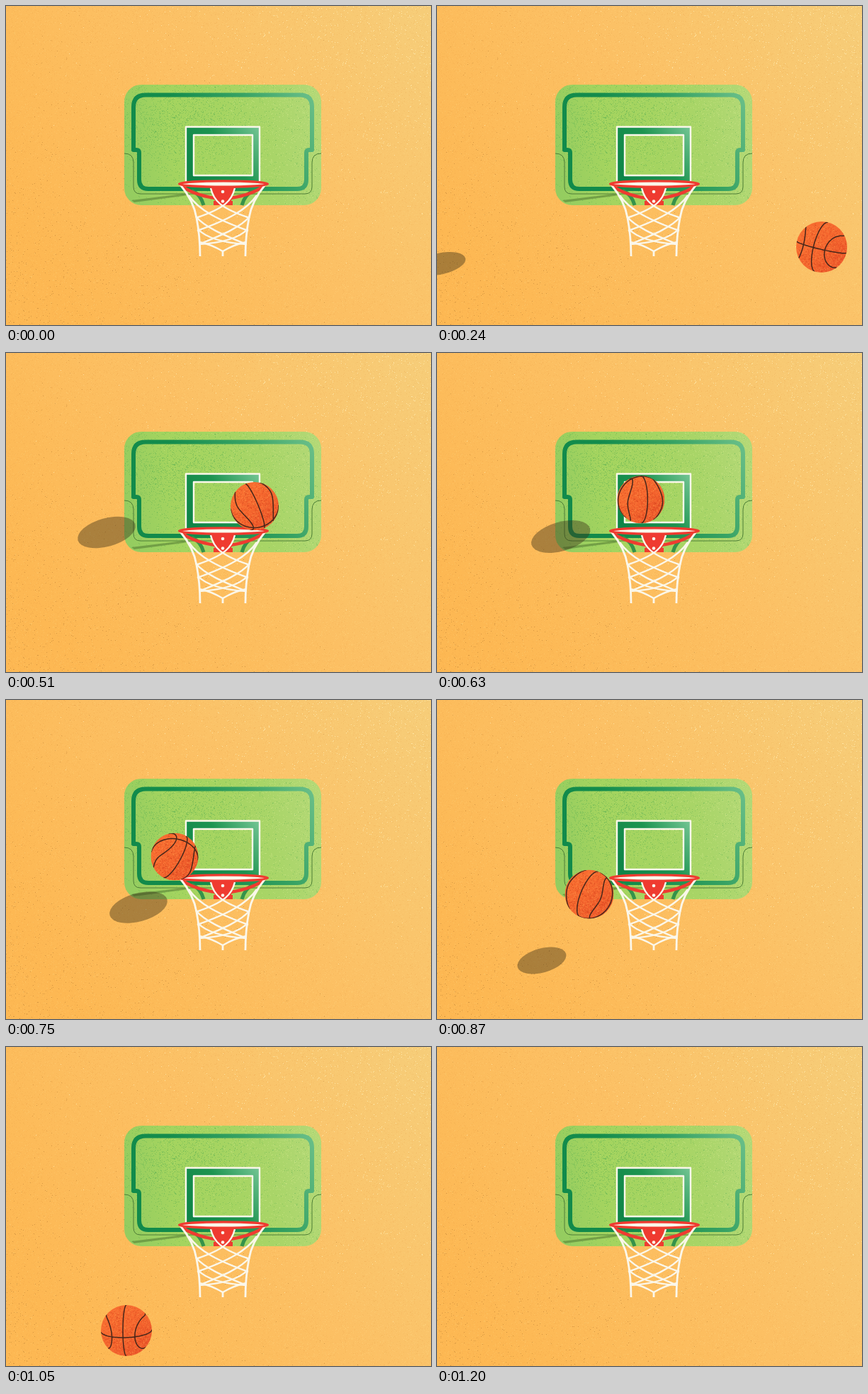
Animation of 600 by 450 pixels, one loop 2550 ms. Source, as an HTML page with a canvas:

```html
<!DOCTYPE html>
<html lang="en">
<head>
<meta charset="utf-8">
<title>Rim shot</title>
<style>
html, body { margin: 0; width: 100%; height: 100%; overflow: hidden; background: #fcbf62; }
canvas { display: block; width: 600px; height: 450px; }
</style>
</head>
<body>
<canvas id="stage" width="600" height="450"></canvas>
<script>
const W = 600, H = 450, LOOP = 2550, STEP = 30, START = 90, END = 1200;
const WHITE = '#fbf7ea', RED = '#ef3b30';
const ctx = document.getElementById('stage').getContext('2d');

function seeded(seed) {
  return () => {
    seed = (seed + 0x6D2B79F5) | 0;
    let t = Math.imul(seed ^ (seed >>> 15), 1 | seed);
    t = (t + Math.imul(t ^ (t >>> 7), 61 | t)) ^ t;
    return ((t ^ (t >>> 14)) >>> 0) / 4294967296;
  };
}

function layer(paint) {
  const c = document.createElement('canvas');
  c.width = W;
  c.height = H;
  paint(c.getContext('2d'));
  return c;
}

function ramp(g, x0, y0, x1, y1, ...colors) {
  const r = g.createLinearGradient(x0, y0, x1, y1);
  colors.forEach((c, i) => r.addColorStop(i / (colors.length - 1), c));
  return r;
}

function stroke(g, d, color, width) {
  g.strokeStyle = color;
  g.lineWidth = width;
  g.stroke(new Path2D(d));
}

// Scatter pixels in a box; weight(u, v) is the chance that a dot is kept.
function speckle(g, rnd, n, [x, y, w, h], color, weight) {
  g.fillStyle = color;
  for (let i = 0; i < n; i++) {
    const u = rnd(), v = rnd();
    if (rnd() < weight(u, v)) g.fillRect(Math.floor(x + u * w), Math.floor(y + v * h), 1, 1);
  }
}

function paintWall(g) {
  const rnd = seeded(7), all = [0, 0, W, H];
  g.fillStyle = ramp(g, 60, 380, 600, 0, '#fdb853', '#fcc064', '#f6cd79');
  g.fillRect(0, 0, W, H);
  speckle(g, rnd, 26000, all, 'rgba(255,222,140,.25)', u => .25 + .5 * u);
  speckle(g, rnd, 26000, all, 'rgba(226,150,60,.18)', u => .8 - .4 * u);
  speckle(g, rnd, 9000, all, 'rgba(255,236,175,.8)', (u, v) => Math.pow(u * (1 - v), 2));
  speckle(g, rnd, 7000, all, 'rgba(176,118,48,.5)', (u, v) => .7 * Math.pow((1 - u) * v, 2));
  speckle(g, rnd, 1500, all, 'rgba(176,118,48,.4)', u => .5 * Math.pow(1 - u, 5));
}

function paintBoard(g) {
  const rnd = seeded(21), box = [167, 111, 278, 170];
  g.save();
  g.beginPath();
  g.roundRect(...box, 24);
  g.clip();
  g.fillStyle = ramp(g, 167, 215, 445, 175, '#94cc60', '#a4d45f', '#a5d461', '#a9d568', '#b3d876');
  g.fillRect(...box);
  speckle(g, rnd, 10000, box, 'rgba(92,176,82,.45)',
    (u, v) => .08 + .8 * Math.exp(-12 * ((u - .28) ** 2 + (v - .35) ** 2)));
  speckle(g, rnd, 6000, box, 'rgba(205,230,135,.55)', (u, v) => u * u * (1 - .6 * v));
  g.restore();

  g.lineJoin = 'round';
  stroke(g, 'M167 208Q180 208 180 221V255Q180 265 190 265H422Q432 265 432 255V221Q432 208 445 208',
    '#4c7d36', 1);
  stroke(g, 'M197 125.500H415Q432 125.500 432 142.500V203H428Q424 203 424 207V245Q424 258 411 258' +
    'H201Q188 258 188 245V207Q188 203 184 203H180V142.500Q180 125.500 197 125.500Z',
    ramp(g, 190, 240, 425, 110, '#118a4b', '#138c4c', '#36a263', '#6abf89'), 6);

  g.fillStyle = ramp(g, 265, 240, 358, 172, '#0f8548', '#1c9450', '#74c594');
  g.beginPath();
  g.rect(254, 170, 104, 77);
  g.rect(265, 182, 83, 57);
  g.fill('evenodd');
  g.strokeStyle = WHITE;
  g.lineWidth = 2.4;
  g.strokeRect(254, 170.500, 104, 78);
  g.strokeRect(265, 182, 83, 57);

  g.fillStyle = 'rgba(80,120,50,.55)';
  g.fill(new Path2D('M177 274L250 265L260 266L250 268L181 277Z'));
}

function mirrored(g, draw) {
  draw();
  g.save();
  g.translate(612, 0);
  g.scale(-1, 1);
  draw();
  g.restore();
}

function paintHoop(g) {
  mirrored(g, () => {
    stroke(g, 'M262 260Q275 266 279 281', '#35924a', 5);
    stroke(g, 'M247 253Q263 266 295 271', RED, 4.500);
  });
  g.fillStyle = RED;
  g.fill(new Path2D('M289 255H323L318 275H320V281H293V275H295Z'));
  g.fillStyle = WHITE;
  for (const y of [262, 275.500]) {
    g.beginPath();
    g.arc(306, y, 2.300, 0, 7);
    g.fill();
  }

  mirrored(g, () => {
    stroke(g, 'M246 252Q265 275 269 299Q274 325 274 353', WHITE, 2.800);
    stroke(g, 'M289 257C293 274 302 285 344 299', WHITE, 2.400);
    stroke(g, 'M258 267C272 288 300 302 342 317', WHITE, 2.400);
    stroke(g, 'M268 297C280 311 302 321 339 336', WHITE, 2.400);
    stroke(g, 'M271 315C282 326 304 334 339 336', WHITE, 2.400);
    stroke(g, 'M273 333Q289 336 306 346', WHITE, 2.400);
  });
  stroke(g, 'M306 345V353', WHITE, 2.800);

  g.fillStyle = WHITE;
  g.strokeStyle = RED;
  g.lineWidth = 3.2;
  g.beginPath();
  g.ellipse(307, 251, 62.500, 4.2, 0, 0, 7);
  g.fill();
  g.stroke();
}

const wall = layer(g => { paintWall(g); paintBoard(g); });
const hoop = layer(paintHoop);

// time, x, y, radius, pitch, yaw, roll
const BALL = [
  [90, 642, 468, 37, -.65, -.5, .5],
  [240, 543, 340, 36, .1, -.32, .26],
  [510, 351, 216, 34, 1.13, .15, -.4],
  [750, 238, 221, 33.5, 2.25, .27, .5],
  [870, 215, 274, 34.5, 1.57, -.35, .4],
  [1050, 170, 400, 36, .28, -.14, 0],
  [1140, 148, 463, 36, -.3, -.2, -.15],
  [1200, 134, 505, 36, -.7, -.2, -.25]
];
// time, x, y, half length, half height, tilt
const SHADE = [
  [90, -85, 446, 34, 14, -.2],
  [240, 5, 363.5, 36, 15, -.21],
  [510, 142, 253, 42, 20, -.27],
  [750, 187, 292.5, 42, 20, -.27],
  [870, 148, 367.5, 35.5, 17, -.27],
  [1050, 92, 488, 34, 16, -.27],
  [1200, 45, 590, 34, 16, -.27]
];

// Smooth curve through the rows of a table.
function sample(rows, t) {
  let i = 0;
  while (i < rows.length - 2 && t >= rows[i + 1][0]) i++;
  const a = rows[i], b = rows[i + 1], p = rows[i - 1] || a, n = rows[i + 2] || b;
  const d = b[0] - a[0], s = (t - a[0]) / d, s2 = s * s, s3 = s2 * s;
  return a.slice(1).map((v, j) => {
    const k = j + 1;
    const ma = (b[k] - p[k]) / (b[0] - p[0]) * d, mb = (n[k] - a[k]) / (n[0] - a[0]) * d;
    return (2 * s3 - 3 * s2 + 1) * v + (s3 - 2 * s2 + s) * ma +
      (3 * s2 - 2 * s3) * b[k] + (s3 - s2) * mb;
  });
}

// Four closed seams on the unit sphere.
const sideSeam = sign => f => {
  const q = .9 + .2 * Math.cos(2 * f);
  return [sign * Math.cos(q), Math.sin(q) * Math.sin(f), Math.sin(q) * Math.cos(f)];
};
const SEAMS = [
  f => [0, Math.sin(f), Math.cos(f)],
  f => [Math.sin(f), 0, Math.cos(f)],
  sideSeam(1),
  sideSeam(-1)
];

const ballRnd = seeded(5);
const GRAIN = Array.from({ length: 1300 }, () => {
  const a = ballRnd() * 2 * Math.PI, q = Math.sqrt(ballRnd()) * .97;
  return [q * Math.cos(a), q * Math.sin(a), ballRnd()];
});

function turn([x, y, z], pitch, yaw) {
  const cp = Math.cos(pitch), sp = Math.sin(pitch), cy = Math.cos(yaw), sy = Math.sin(yaw);
  const y1 = y * cp + z * sp, z1 = z * cp - y * sp;
  return [x * cy + z1 * sy, y1, z1 * cy - x * sy];
}

function drawBall([x, y, r, pitch, yaw, roll]) {
  ctx.save();
  ctx.translate(x, y);
  ctx.beginPath();
  ctx.arc(0, 0, r, 0, 7);
  ctx.clip();
  ctx.fillStyle = ramp(ctx, -r * .7, -r * .7, r * .7, r * .7, '#f86d30', '#f5662e', '#ec562a');
  ctx.fillRect(-r, -r, 2 * r, 2 * r);
  for (const [u, v, k] of GRAIN) {
    ctx.fillStyle = k < .6 ? 'rgba(255,146,72,.6)' : 'rgba(205,62,28,.5)';
    ctx.fillRect(u * r, v * r, 1, 1);
  }
  ctx.rotate(roll);
  ctx.strokeStyle = '#45261a';
  ctx.lineWidth = 1.5;
  ctx.lineJoin = 'round';
  ctx.beginPath();
  for (const seam of SEAMS) {
    let pen = false;
    for (let i = 0; i <= 96; i++) {
      const [px, py, pz] = turn(seam(i * Math.PI / 48), pitch, yaw);
      if (pz > 0) ctx[pen ? 'lineTo' : 'moveTo'](px * r, py * r);
      pen = pz > 0;
    }
  }
  ctx.stroke();
  ctx.restore();
}

function drawShade([x, y, a, b, tilt]) {
  ctx.fillStyle = 'rgba(60,50,24,.43)';
  ctx.beginPath();
  ctx.ellipse(x, y, a, b, tilt, 0, 7);
  ctx.fill();
}

function frame() {
  const t = Math.floor(performance.now() % LOOP / STEP) * STEP;
  const flying = t >= START && t < END;
  ctx.drawImage(wall, 0, 0);
  if (flying) drawShade(sample(SHADE, t));
  ctx.drawImage(hoop, 0, 0);
  if (flying) drawBall(sample(BALL, t));
  requestAnimationFrame(frame);
}
frame();
</script>
</body>
</html>
```
